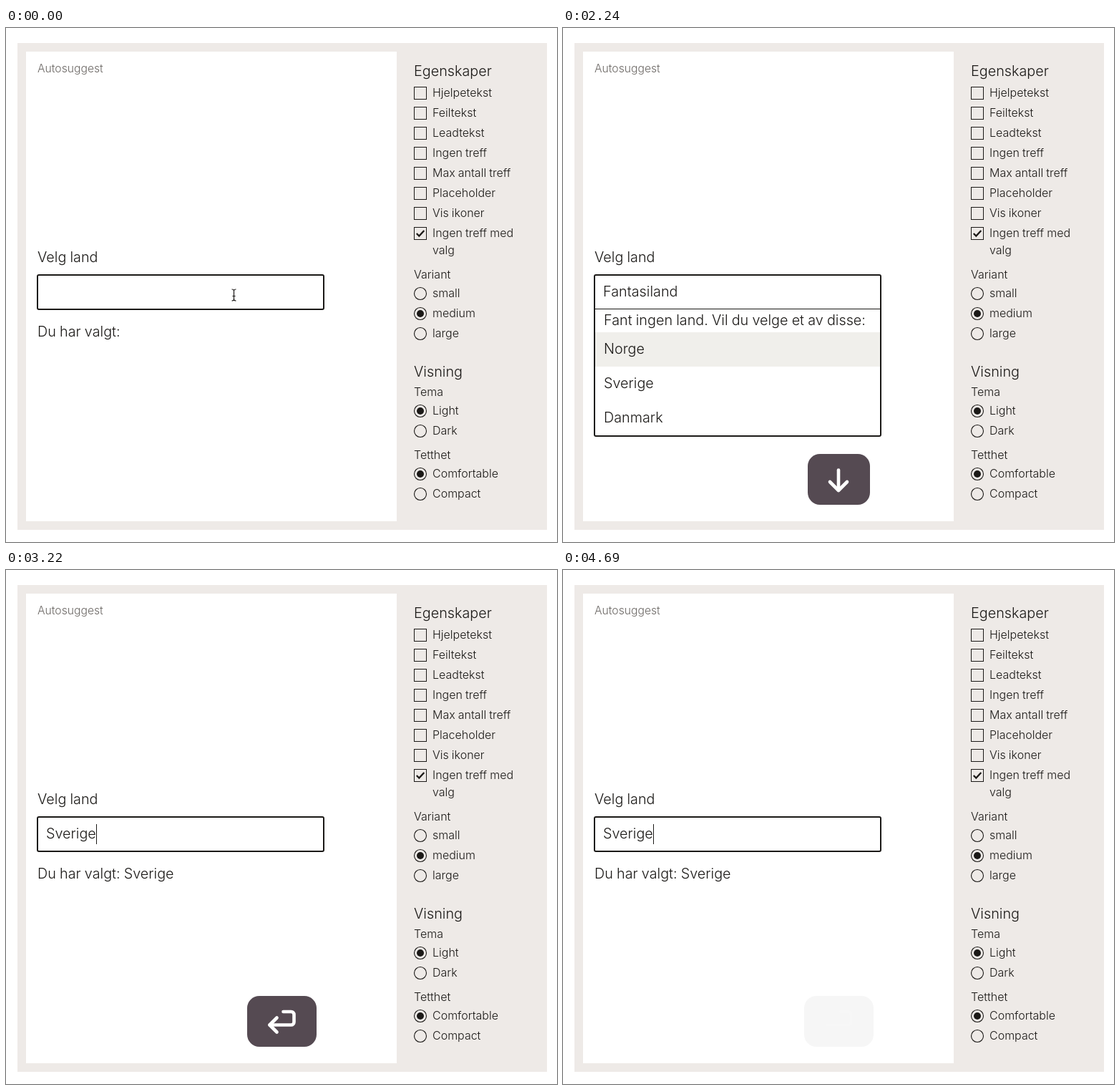
An HTML page with a canvas that plays this animation: 770x718 px, repeating every 4760 ms.

```html
<!DOCTYPE html>
<html lang="no">
<head>
<meta charset="utf-8">
<title>Autosuggest</title>
<style>
  html, body { margin: 0; width: 100%; height: 100%; overflow: hidden; background: #fff; }
  canvas { display: block; }
</style>
</head>
<body>
<canvas id="stage" width="770" height="718"></canvas>
<script>
const ctx = document.getElementById('stage').getContext('2d');
const LOOP = 4760, STEP = 70;
const INK = '#1b1917', SAND = '#eeeae7', KEY = '#554a52';
const HALF = '#f0efeb', FULL = '#e4dfd9';
const BIG = 19.8, SMALL = 16;

// Moments at which each letter of the search word is typed
const WORD = 'Fantasiland';
const TYPED = [70, 280, 490, 630, 770, 980, 1120, 1260, 1330, 1470, 1610];
const DOWN1 = 2170, DOWN2 = 2660, ENTER = 3220;

function text(str, x, y, size = BIG, color = INK) {
  ctx.font = `300 ${size}px Inter, "Open Sans", sans-serif`;
  ctx.wordSpacing = '-0.4px';
  ctx.fillStyle = color;
  ctx.fillText(str, x, y);
  return ctx.measureText(str).width;
}

function rect(x, y, w, h, color) {
  ctx.fillStyle = color;
  ctx.fillRect(x, y, w, h);
}

function line(points, width, color) {
  ctx.beginPath();
  points.forEach(([x, y]) => ctx.lineTo(x, y));
  ctx.lineWidth = width;
  ctx.strokeStyle = color;
  ctx.stroke();
}

function frame(x, y, w, h) {
  ctx.beginPath();
  ctx.roundRect(x + 1, y + 1, w - 2, h - 2, 2);
  ctx.fillStyle = '#fff';
  ctx.fill();
  ctx.lineWidth = 2;
  ctx.strokeStyle = INK;
  ctx.stroke();
}

function checkbox(label, y, checked) {
  ctx.lineWidth = 1;
  ctx.strokeStyle = INK;
  ctx.strokeRect(570.5, y - 8.5, 17, 17);
  if (checked) line([[573.8, y], [577.3, y + 3.5], [584.3, y - 4]], 2.3, INK);
  text(label, 596, y + 5, SMALL);
}

function radio(label, y, chosen) {
  ctx.beginPath();
  ctx.arc(579, y, 8.5, 0, 7);
  ctx.lineWidth = 1.1;
  ctx.strokeStyle = INK;
  ctx.stroke();
  if (chosen) {
    ctx.beginPath();
    ctx.arc(579, y, 5, 0, 7);
    ctx.fillStyle = INK;
    ctx.fill();
  }
  text(label, 596, y + 5, SMALL);
}

function sidebar() {
  text('Egenskaper', 570, 67);
  ['Hjelpetekst', 'Feiltekst', 'Leadtekst', 'Ingen treff', 'Max antall treff',
    'Placeholder', 'Vis ikoner', 'Ingen treff med']
    .forEach((label, i) => checkbox(label, 91 + 28 * i, i === 7));
  text('valg', 596, 316, SMALL);
  text('Variant', 570, 350, SMALL);
  ['small', 'medium', 'large'].forEach((label, i) => radio(label, 371 + 28 * i, i === 1));
  text('Visning', 570, 487);
  text('Tema', 570, 514, SMALL);
  radio('Light', 535, true);
  radio('Dark', 563, false);
  text('Tetthet', 570, 602, SMALL);
  radio('Comfortable', 623, true);
  radio('Compact', 651, false);
}

function pointer() {
  for (const s of [1, -1]) {
    ctx.beginPath();
    ctx.moveTo(318.5, 373);
    ctx.lineTo(318.5, 373 - 6 * s);
    ctx.quadraticCurveTo(318.5, 373 - 8 * s, 315.5, 373 - 8 * s);
    ctx.moveTo(318.5, 373 - 6 * s);
    ctx.quadraticCurveTo(318.5, 373 - 8 * s, 321.5, 373 - 8 * s);
    ctx.lineWidth = 1.2;
    ctx.strokeStyle = INK;
    ctx.stroke();
  }
  line([[316.5, 374.5], [320.5, 374.5]], 1, INK);
}

function dropdown(t) {
  frame(43, 344, 402, 227);
  rect(45, 392, 398, 1, INK);
  if (t >= DOWN1) {
    const second = t >= DOWN2;
    const age = t - (second ? DOWN2 : DOWN1 + STEP);
    if (age >= 0) rect(45, second ? 473 : 425, 398, 48, age < STEP ? HALF : FULL);
  }
  text('Fant ingen land. Vil du velge et av disse:', 57, 415);
  ['Norge', 'Sverige', 'Danmark'].forEach((name, i) => text(name, 57, 455 + 48 * i));
}

function keycap(t) {
  if (t < DOWN1) return;
  const enter = t >= ENTER, w = enter ? 97 : 87;
  const age = t - (enter ? ENTER : t >= DOWN2 ? DOWN2 : DOWN1);
  let scale = 1;
  if (t >= DOWN2 && !enter) scale = 1 - 0.13 * Math.max(0, 1 - Math.abs(age - STEP) / (age < STEP ? 140 : 280));
  ctx.save();
  ctx.globalAlpha = Math.max(0, Math.min(1, (4717 - t) / 517));
  ctx.translate(385.5, 630.5);
  ctx.scale(scale, scale);
  ctx.beginPath();
  ctx.roundRect(-w / 2, -35.5, w, 71, 17);
  ctx.fillStyle = KEY;
  ctx.fill();
  ctx.lineCap = ctx.lineJoin = 'round';
  if (enter) {
    ctx.beginPath();
    ctx.moveTo(2, -13.5);
    ctx.arcTo(17, -13.5, 17, 5, 4);
    ctx.arcTo(17, 5, -17, 5, 4);
    ctx.lineTo(-17, 5);
    ctx.lineWidth = 4.6;
    ctx.strokeStyle = '#fff';
    ctx.stroke();
    line([[-7, -5], [-17, 5], [-7, 15]], 4.6, '#fff');
  } else {
    line([[-0.5, -13], [-0.5, 15]], 4.6, '#fff');
    line([[-12.5, 3.5], [-0.5, 15.5], [11.5, 3.5]], 4.6, '#fff');
  }
  ctx.restore();
}

function draw(t) {
  rect(0, 0, 770, 718, '#fff');
  rect(16, 21, 740, 680, SAND);
  rect(28, 33, 518, 656, '#fff');
  text('Autosuggest', 44, 62, 15.7, '#6c6865');
  sidebar();

  const done = t >= ENTER;
  const value = done ? 'Sverige' : WORD.slice(0, TYPED.filter(at => t >= at).length);
  text('Velg land', 44, 327);
  text('Du har valgt:' + (done ? ' Sverige' : ''), 44, 431);
  if (value && !done) dropdown(t);
  else frame(43, 344, 402, 50);

  const width = text(value, 56, 375);
  const blink = (t >= DOWN1 && t < DOWN2) || (t >= 3990 && t < 4480);
  if (!value) pointer();
  else if (!blink) rect(Math.ceil(56 + width), 355, 1, 28, INK);
  keycap(t);
}

const start = performance.now();
function tick() {
  const t = (performance.now() - start) % LOOP;
  draw(Math.floor(t / STEP) * STEP);
  requestAnimationFrame(tick);
}
tick();
</script>
</body>
</html>
```
